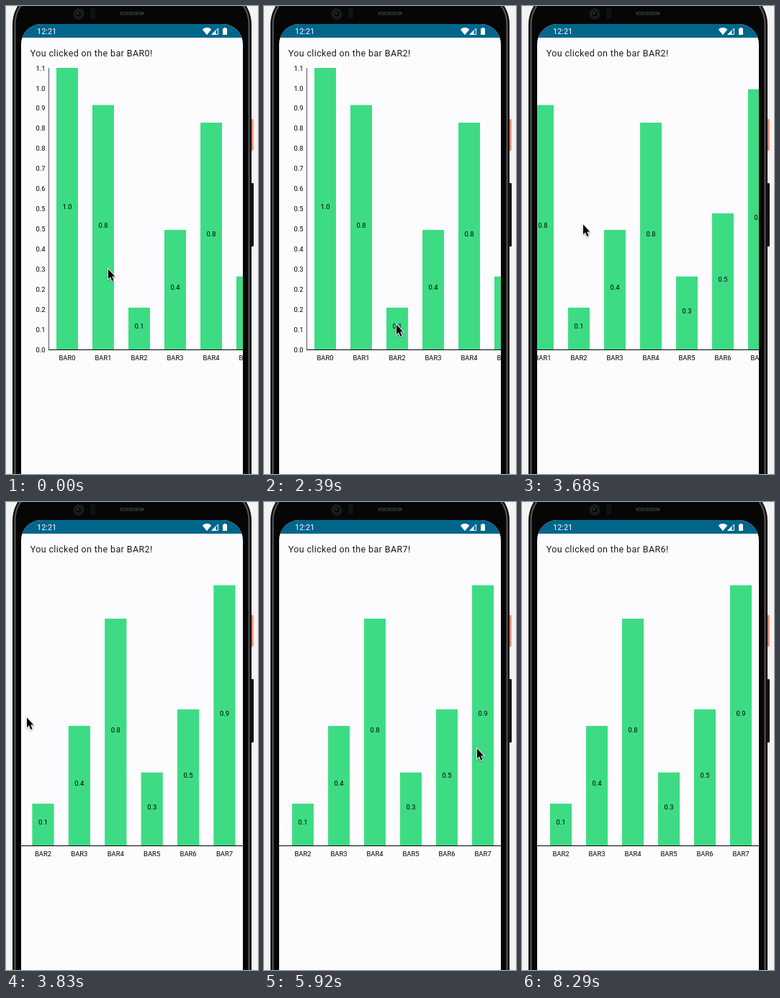
An HTML page that plays this animation: 350 by 650 pixels, repeating every 9320 ms.

```html
<!DOCTYPE html>
<html lang="en">
<head>
<meta charset="utf-8">
<title>Clickable bar chart</title>
<style>
html, body { margin: 0; width: 100%; height: 100%; overflow: hidden; background: #f3f3f3; }
svg { display: block; }
text { font-family: Roboto, Arial, sans-serif; }
.title { font-size: 12.48px; letter-spacing: .39px; fill: #1a1c1e; }
.chart text { font-size: 9.36px; text-anchor: middle; fill: #000; }
.bar { fill: #3ddc84; }

#lines, #chart, #cursor { animation: 9.32s step-end infinite; }
#lines { animation-name: lines; }
#chart { animation-name: scroll; }
#cursor { animation-name: cursor; filter: drop-shadow(0 1px 1px rgba(0, 0, 0, .35)); }

@keyframes lines {
  0% { transform: translateY(0); }
  11.26% { transform: translateY(-20px); }
  25.64% { transform: translateY(-40px); }
  63.51% { transform: translateY(-60px); }
  77.78%, 100% { transform: translateY(-80px); }
}

/* drag to the end, overscroll stretch, release */
@keyframes scroll {
  0% { transform: translateX(0) scaleX(1); }
  36.37% { transform: translateX(-3px) scaleX(1); }
  37.98% { transform: translateX(-46.5px) scaleX(1); }
  39.48% { transform: translateX(-106px) scaleX(1); }
  41.09% { transform: translateX(-135px) scaleX(1.008); }
  42.7% { transform: translateX(-134.75px) scaleX(1.0077); }
  55.47% { transform: translateX(-132.1px) scaleX(1.002); }
  57.08%, 100% { transform: translateX(-131px) scaleX(1); }
}

@keyframes cursor {
  0% { transform: translate(141px, 364px); }
  1.6% { transform: translate(149px, 367px); }
  3.21% { transform: translate(140px, 370px); }
  4.82% { transform: translate(133px, 370px); }
  14.48% { transform: translate(148px, 388px); }
  16.09% { transform: translate(182px, 420px); }
  17.7% { transform: translate(204px, 438px); }
  19.31% { transform: translate(194px, 441px); }
  20.81% { transform: translate(183px, 441px); }
  27.25% { transform: translate(183px, 442px); }
  30.15% { transform: translate(190px, 428px); }
  31.65% { transform: translate(205px, 390px); }
  33.26% { transform: translate(214px, 346px); }
  34.87% { transform: translate(212px, 318px); }
  36.37% { transform: translate(192px, 308px); }
  37.98% { transform: translate(145px, 305.5px); }
  39.48% { transform: translate(84px, 302px); }
  41.09% { transform: translate(28px, 298px); }
  42.7% { transform: translate(22px, 298px); }
  53.86% { transform: translate(122px, 317px); }
  55.47% { transform: translate(228px, 335px); }
  57.08% { transform: translate(295px, 341px); }
  66.73% { transform: translate(287px, 345px); }
  68.34% { transform: translate(276px, 352px); }
  69.95% { transform: translate(266px, 359px); }
  71.45% { transform: translate(258px, 365px); }
  73.06% { transform: translate(253px, 370px); }
  74.67% { transform: translate(252px, 371px); }
  84.22% { transform: translate(252px, 372px); }
  87.44% { transform: translate(275px, 421px); opacity: 1; }
  88.94%, 100% { transform: translate(275px, 421px); opacity: 0; }
}
</style>
</head>
<body>
<svg width="350" height="650" viewBox="0 0 350 650">
  <defs>
    <clipPath id="screen"><rect x="21" y="25" width="308" height="700" rx="28"/></clipPath>
    <clipPath id="titleBox"><rect x="21" y="56" width="308" height="20"/></clipPath>
  </defs>

  <!-- phone -->
  <rect x="340" y="157" width="3.5" height="44" rx="1" fill="#f0826c"/>
  <rect x="340" y="246" width="4" height="88" rx="1" fill="#151517"/>
  <rect x="9" y="-24" width="332" height="760" rx="50" fill="#0d0d0f"/>
  <rect x="12.5" y="-20.5" width="325" height="753" rx="46" fill="#060607" stroke="#55575a" stroke-width="2"/>
  <circle cx="101" cy="11" r="8" fill="#17181a"/>
  <circle cx="101" cy="11" r="4.5" fill="#08090b" stroke="#2c2d31"/>
  <circle cx="100" cy="10" r="1.3" fill="#42454c"/>
  <rect x="117" y="3" width="7" height="15" rx="2" fill="#101113"/>
  <rect x="158" y="8" width="34" height="4.5" rx="2.2" fill="#2b2c2e"/>
  <path d="M161 10.2h28" stroke="#151617" stroke-width="2" stroke-dasharray="5 2"/>

  <g clip-path="url(#screen)">
    <rect x="21" y="25" width="308" height="640" fill="#fcfcff"/>
    <rect x="21" y="25" width="308" height="19" fill="#00658b"/>
    <g fill="#fff">
      <text x="43" y="39" font-size="10.92">12:21</text>
      <path d="M272.7 32.4Q279 27.6 285.3 32.4L279 40.2Z"/>
      <path d="M291.5 33.5V40H285z"/>
      <path d="M294.5 31.2v8.3h-8.3z" fill="none" stroke="#fff"/>
      <path d="M303 30h2v1h2v9h-6v-9h2z"/>
    </g>

    <g clip-path="url(#titleBox)"><g id="lines" class="title"></g></g>
    <g id="chart" class="chart"></g>
  </g>

  <g id="cursor">
    <path d="M1 1.5v13.7l3-2.9 2.4 5.7 2.2-.9-2.4-5.6h4.1z" fill="#000" stroke="#fff" stroke-width="1.7" paint-order="stroke"/>
  </g>
</svg>

<script>
const BASE = 477, TOP = 86;
const bars = [
  [86, '1.0'], [137.6, '0.8'], [419, '0.1'], [311, '0.4'],
  [162, '0.8'], [375.6, '0.3'], [288, '0.5'], [115.6, '0.9']
];
const ticks = '1.1 1.0 0.9 0.8 0.8 0.7 0.6 0.5 0.5 0.4 0.3 0.2 0.2 0.1 0.0'.split(' ');

const label = (x, y, s) => `<text x="${x}" y="${y}">${s}</text>`;
const bar = ([top, value], i) => {
  const x = 70 + 50 * i;
  return `<rect class="bar" x="${x}" y="${top}" width="30" height="${BASE - top}"/>` +
    label(x + 15, (top + BASE) / 2 + .4, value) + label(x + 15, 491.6, 'BAR' + i);
};
const tick = (s, i) => label(48, TOP + 3.6 + i * (BASE - TOP) / 14, s);

document.getElementById('chart').innerHTML =
  ticks.map(tick).join('') + bars.map(bar).join('') +
  `<path d="M59.5 ${TOP}V${BASE + .5}" stroke="#55565a" fill="none"/>` +
  `<path d="M59 ${BASE + .5}H470" stroke="#000" fill="none"/>`;

document.getElementById('lines').innerHTML = [0, 1, 2, 7, 6]
  .map((n, i) => label(33.7, 70 + 20 * i, `You clicked on the bar BAR${n}!`)).join('');
</script>
</body>
</html>
```
